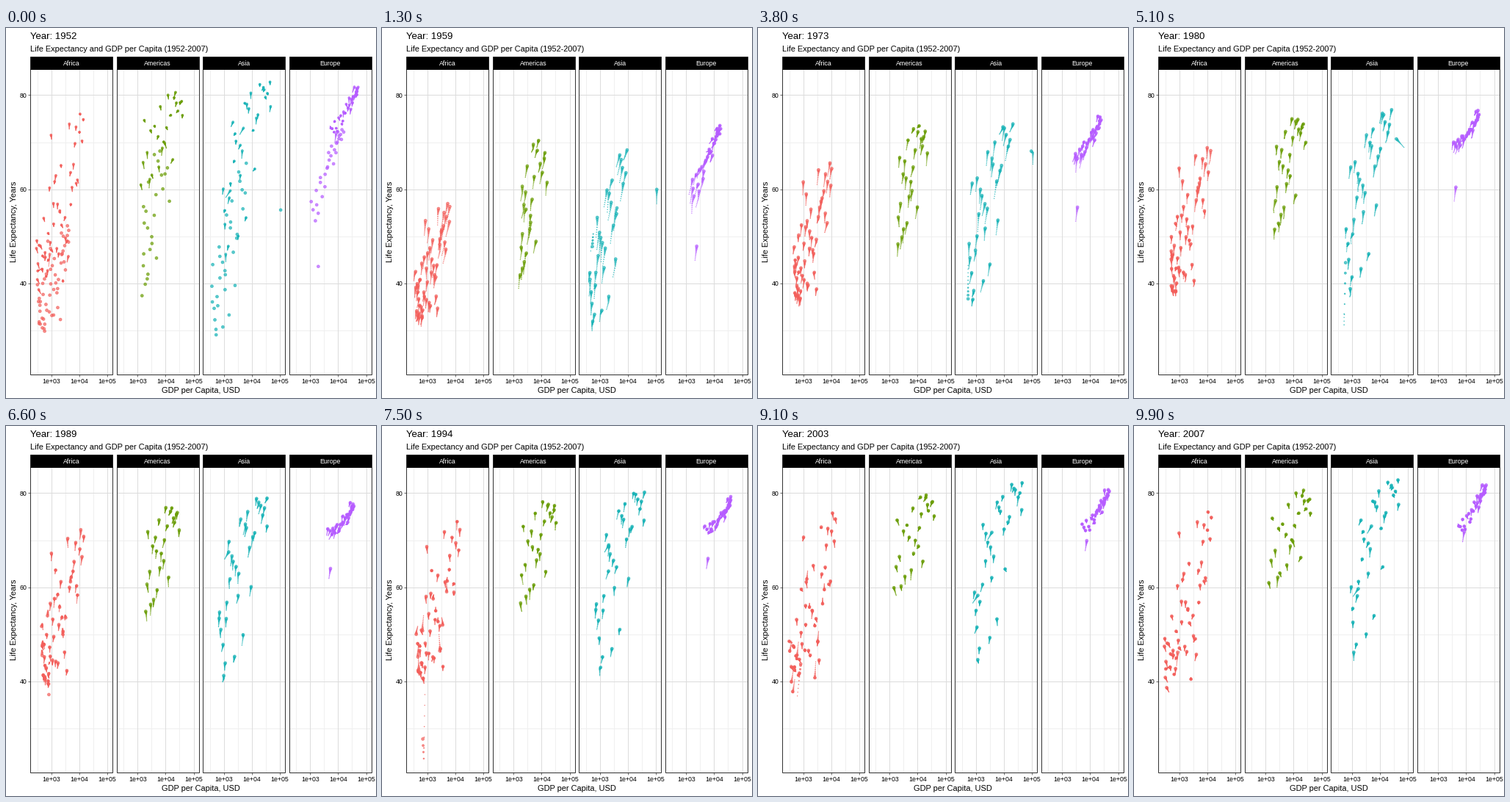
Animation of 504 by 504 pixels, one loop 10 s. Source, as a matplotlib script:

```python
import numpy as np
import matplotlib.pyplot as plt
from matplotlib.animation import FuncAnimation
from matplotlib.colors import to_rgb
from matplotlib.patches import Rectangle

plt.rcParams["font.family"] = "Liberation Sans"

SIZE, FRAMES, WAKE = 504, 100, 10
ALPHA = .7
FIRST, LAST = 1952, 2007
CENSUS = np.arange(FIRST, LAST + 1, 5)
YEARS = np.linspace(FIRST, LAST, FRAMES)
LEFT, WIDTH, GAP = 33.2, 112, 5.5
STRIP, TOP, BOTTOM = 39, 55.8, 472
X_RANGE, Y_RANGE = (2.248, 5.189), (20.65, 85.55)

# Income (log10) and life expectancy of the lowest, middle and highest
# country (columns) at the start, middle and end of the period (rows).
# "mix" loosens the link between the two rankings.
PANELS = [
    dict(name="Africa", color="#F35E5A", count=51, mix=.4, setback=14,
         income=[(2.5, 3.0, 3.65), (2.7, 3.12, 4.1), (2.45, 3.15, 4.12)],
         life=[(30, 39, 52), (38, 49.5, 68.5), (42, 55.5, 76)]),
    dict(name="Americas", color="#6A9D05", count=25, mix=.25, setback=0,
         income=[(3.2, 3.48, 4.12), (3.3, 3.8, 4.4), (3.12, 3.93, 4.62)],
         life=[(38, 54, 68.5), (51, 67, 75), (61, 73, 80.5)]),
    dict(name="Asia", color="#17B3B7", count=30, mix=.2, setback=0,
         income=[(2.6, 3.1, 3.8), (2.8, 3.5, 4.4), (2.98, 3.7, 4.65)],
         life=[(29, 45, 65), (39, 62.5, 76.5), (46, 71, 82.5)]),
    dict(name="Europe", color="#B65CFF", count=29, mix=.1, setback=0,
         income=[(3.05, 3.7, 4.15), (3.55, 4.15, 4.45), (3.75, 4.35, 4.7)],
         life=[(53.5, 66, 72.5), (69, 72.5, 76.5), (71.8, 77.5, 81.8)]),
]

# Countries that leave the crowd: panel, then (year, income, life) points.
LONERS = [
    (0, [(1952, 2.69, 40), (1987, 2.93, 44), (1992, 2.87, 23.6),
         (1997, 2.77, 36.1), (2002, 2.9, 43.4), (2007, 2.94, 46.2)]),
    (2, [(1952, 2.57, 39.4), (1967, 2.72, 45.4), (1977, 2.72, 31.2),
         (1982, 2.8, 51), (1997, 2.87, 56.5), (2007, 3.23, 59.7)]),
    (2, [(1952, 2.6, 44), (1957, 2.76, 50.5), (1962, 2.69, 44.5),
         (1967, 2.79, 58.4), (1982, 2.98, 65.5), (2007, 3.7, 73)]),
    (2, [(1952, 5.03, 55.6), (1972, 5.04, 67.7), (1982, 4.5, 71.3),
         (2007, 4.67, 77.6)]),
    (3, [(1952, 3.29, 43.6), (1980, 3.63, 60.3), (2007, 3.93, 71.8)]),
]


def panel_left(k):
    return LEFT + k * (WIDTH + GAP)


def to_x(income, k):
    lo, hi = X_RANGE
    return panel_left(k) + (income - lo) / (hi - lo) * WIDTH


def to_y(life):
    lo, hi = Y_RANGE
    return BOTTOM - (life - lo) / (hi - lo) * (BOTTOM - TOP)


def basis(t):
    """Quadratic weights of key values at 0, 1/2 and 1."""
    return np.array([2 * (t - .5) * (t - 1), 4 * t * (1 - t), 2 * t * (t - .5)])


def surface(keys, rank):
    """Value of every rank at every census."""
    t = (CENSUS - FIRST) / (LAST - FIRST)
    return basis(rank).T @ np.array(keys).T @ basis(t)


def crowd(p, rng):
    """Income and life expectancy, each countries x censuses."""
    n = p["count"]
    rank = np.linspace(0, 1, n)
    mixed = np.argsort(np.argsort(rank + rng.normal(0, p["mix"], n))) / (n - 1)
    income = surface(p["income"], mixed)
    life = surface(p["life"], rank)
    income += rng.normal(0, .02, income.shape)
    life += rng.normal(0, .3, life.shape)
    # Some middle countries fall back after 1987.
    hit = (rank > .3) & (rank < .85) & (rng.random(n) < .6)
    depth = p["setback"] * hit * rng.random(n)
    life -= np.outer(depth, np.clip((CENSUS - 1987) / 15, 0, 1))
    return income, life


def track(years, income, life, k):
    """Pixel positions of one country in every frame."""
    return np.column_stack([to_x(np.interp(YEARS, years, income), k),
                            to_y(np.interp(YEARS, years, life))])


fig = plt.figure(figsize=(SIZE / 72, SIZE / 72), dpi=72, facecolor="white")
ax = fig.add_axes([0, 0, 1, 1])
ax.set(xlim=(0, SIZE), ylim=(SIZE, 0))
ax.axis("off")


def line(x0, y0, x1, y1, color, lw=1):
    ax.plot([x0, x1], [y0, y1], color=color, lw=lw, zorder=1,
            solid_capstyle="butt")


def label(x, y, s, size, **kw):
    return ax.text(x, y, s, fontsize=size, va="baseline", **kw)


def grid(k, xs, ys, color):
    x0 = panel_left(k)
    for y in ys:
        line(x0, to_y(y), x0 + WIDTH, to_y(y), color)
    for x in xs:
        line(to_x(x, k), TOP, to_x(x, k), BOTTOM, color)


for k, p in enumerate(PANELS):
    x0 = panel_left(k)
    grid(k, (2.5, 3.5, 4.5), (30, 50, 70), "#efefef")
    grid(k, (3, 4, 5), (40, 60, 80), "#dcdcdc")
    for x in (3, 4, 5):
        px = to_x(x, k)
        line(px, BOTTOM, px, BOTTOM + 2.75, "#444444", .8)
        label(px, 484.5, f"1e+0{x}", 8.8, ha="center")
    ax.add_patch(Rectangle((x0, TOP), WIDTH, BOTTOM - TOP, fill=False,
                           ec="#333333", lw=1, zorder=4))
    ax.add_patch(Rectangle((x0, STRIP), WIDTH, TOP - STRIP, fc="black",
                           ec="black", lw=.7, zorder=5))
    label(x0 + WIDTH / 2, 51, p["name"], 8.8, ha="center", color="white",
          zorder=6)

for y in (40, 60, 80):
    line(LEFT - 2.75, to_y(y), LEFT, to_y(y), "#444444", .8)
    label(LEFT - 4.9, to_y(y) + 3.2, str(y), 8.8, ha="right")

title = label(LEFT, 15, "", 13.2)
label(LEFT, 32, "Life Expectancy and GDP per Capita (1952-2007)", 11)
label((LEFT + 498) / 2, 497, "GDP per Capita, USD", 11, ha="center")
ax.text(14, (TOP + BOTTOM) / 2, "Life Expectancy, Years", fontsize=11,
        rotation=90, rotation_mode="anchor", ha="center", va="baseline")

rng = np.random.default_rng(7)
paths, rgb = [], []
for k, p in enumerate(PANELS):
    tracks = [track(CENSUS, g, l, k) for g, l in zip(*crowd(p, rng))]
    tracks += [track(*zip(*points), k) for j, points in LONERS if j == k]
    paths += tracks
    rgb += [to_rgb(p["color"])] * len(tracks)
paths = np.array(paths)

# Trail from oldest to newest; the dots shrink cubically with age.
ages = np.arange(WAKE - 1, -1, -1)
scale = np.repeat((1 - ages / WAKE) ** 3, len(paths))
radius = .375 * (4.27 * scale + .945)
rgba = np.array([(*c, ALPHA) for c in rgb] * WAKE)
dots = ax.scatter(0 * scale, 0 * scale, s=(2 * radius) ** 2, facecolors=rgba,
                  edgecolors=rgba, linewidths=.71, zorder=3)


def update(i):
    dots.set_offsets(np.concatenate([paths[:, (i - a) % FRAMES] for a in ages]))
    title.set_text(f"Year: {round(YEARS[i])}")
    return dots, title


anim = FuncAnimation(fig, update, frames=FRAMES, interval=100, repeat=True,
                     repeat_delay=0, blit=False)
plt.show()
```
